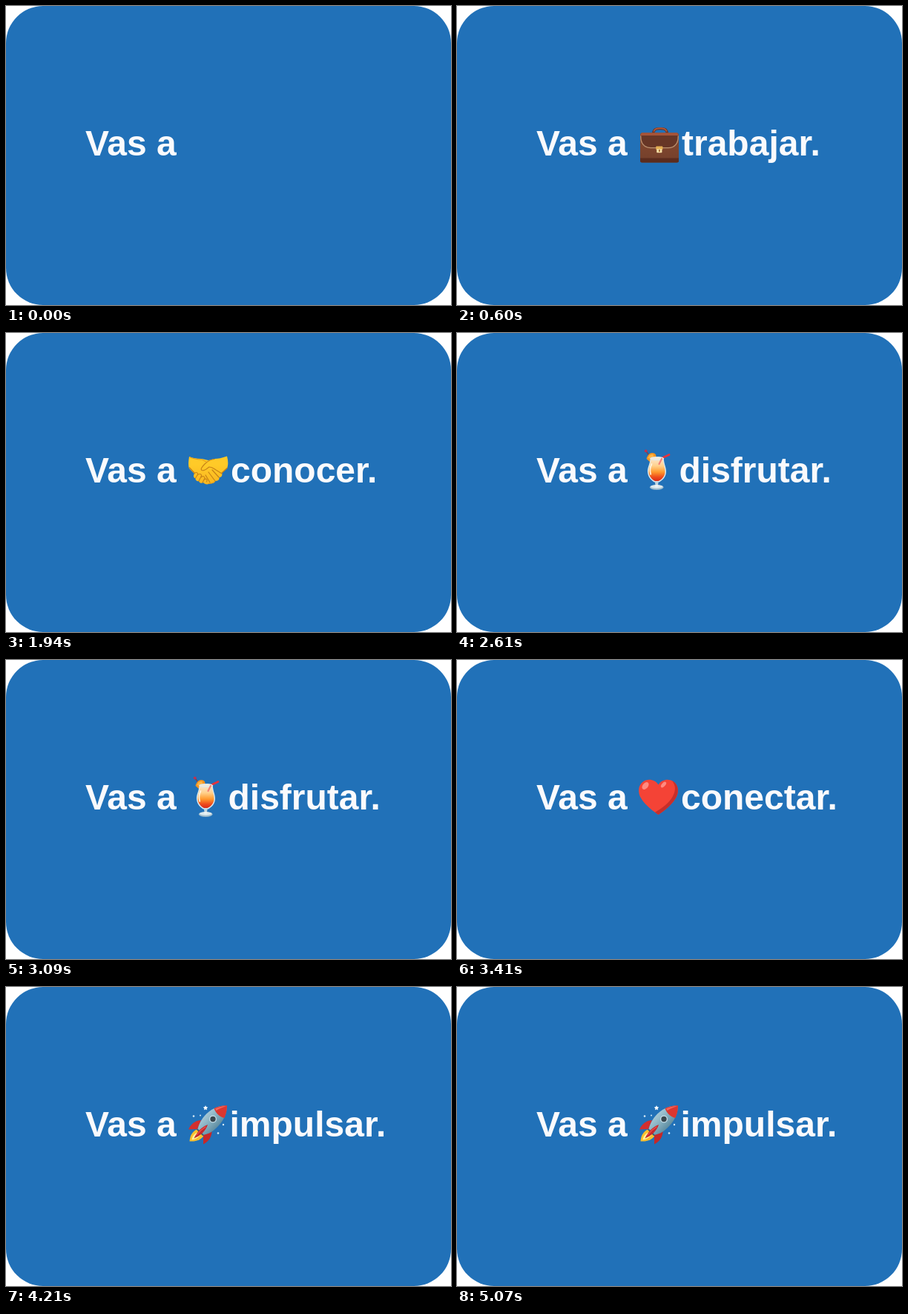
Write an HTML page that moves like this. It is 600 px wide and 404 px high and loops after 5.64 s.

```html
<!DOCTYPE html>
<html lang="es">
<head>
<meta charset="utf-8">
<title>Vas a…</title>
<style>
html, body { margin: 0; width: 100%; height: 100%; overflow: hidden; background: #fff; }
svg { display: block; width: 100%; height: 100%; }
text { font: bold 48px "Liberation Sans", Arial, sans-serif; fill: #fafafc; }
.scene { visibility: hidden; }
.line { fill: none; stroke-linecap: round; stroke-linejoin: round; }
</style>
</head>
<body>
<svg viewBox="0 0 600 404">
  <defs>
    <linearGradient id="leather" x2="0" y2="1">
      <stop offset="0" stop-color="#85492f"/><stop offset="1" stop-color="#74402c"/>
    </linearGradient>
    <linearGradient id="drink" x2="0" y2="1">
      <stop offset="0" stop-color="#fbe3c4"/><stop offset=".3" stop-color="#ffd08a"/>
      <stop offset=".58" stop-color="#ff9a2e"/><stop offset=".82" stop-color="#ee4a1c"/>
      <stop offset="1" stop-color="#d92a1a"/>
    </linearGradient>
    <linearGradient id="hull" x2="1" y2="1">
      <stop offset=".2" stop-color="#b4d3df"/><stop offset=".5" stop-color="#82aebf"/>
      <stop offset=".8" stop-color="#4d7c92"/>
    </linearGradient>
    <linearGradient id="skin" x2="0" y2="1">
      <stop offset=".3" stop-color="#ffca28"/><stop offset="1" stop-color="#f9b61f"/>
    </linearGradient>
  </defs>

  <rect width="600" height="404" rx="50" fill="#2171b8"/>
  <text x="107" y="202">Vas a</text>

  <g class="scene" id="work">
    <path class="line" d="M264.5 172C265.5 166 269 165.6 274 165.6S282.500 166 283.500 172" stroke="#6b3425" stroke-width="3.400"/>
    <path class="line" d="M265.500 169C267 165.500 270 165.200 274 165.200S281 165.500 282.500 169" stroke="#b0593c" stroke-width="1.800"/>
    <path d="M249 171.500H297Q299 171.500 299 174V209Q299 211.500 296.500 211.500H249.500Q247 211.500 247 209V174Q247 171.500 249 171.500Z" fill="url(#leather)"/>
    <path d="M247 205.500H299V209Q299 211.500 296.500 211.500H249.500Q247 211.500 247 209Z" fill="#5b2c1e"/>
    <path d="M248 174H298C299 184 295 191 286 192H260C251 191 247 184 248 174Z" fill="#673626"/>
    <path d="M249 171.300H297L299 175H247Z" fill="#a65438"/>
    <path class="line" d="M247.800 176C247.500 185 252 191.300 261 191.700H285C294 191.300 298.500 185 298.200 176" stroke="#bd9270" stroke-width="1.300"/>
    <rect x="268.300" y="189.500" width="9" height="4.800" rx=".8" fill="#e3ad52"/>
    <rect x="269.200" y="193.300" width="7.200" height="5" rx=".8" fill="#f5dfa6"/>
    <path d="M272 194H273.800V197H272Z" fill="#a86e36"/>
  </g>

  <g class="scene" id="brain">
    <path d="M276 197C279 203 284 207 289 205.500C292 204 295 200 296 196Z" fill="#b94b42"/>
    <path class="line" d="M279 200L291 197M282 203L293 200" stroke="#e08072" stroke-width="1"/>
    <path d="M247 186C246 178 250 172 255 170C260 165 266 164 270 164.500C277 163 285 165 289 168C294 170 298 176 298 181C300 186 300 192 297 196C294 199.500 288 200 284 198C281 201 276 201 272 199C268 203 262 203 258 200C250 199 246 192 247 186Z" fill="#faa3a3"/>
    <path class="line" stroke="#dc6670" stroke-width="1.400" d="M249 181C253 179 254 183 258 181M255 171C255 175 260 174 260 178M262 167C262 171 267 170 267 174C264 174 263 176 264 179M271 165C270 169 275 168 275 172M280 166C278 169 281 171 279 174C276 174 275 177 271 177M288 168C285 171 288 173 287 176C284 176 283 179 279 179M296 176C292 176 293 180 289 181M248 190C252 187 254 191 257 188C260 189 261 185 264 186M254 197C254 193 259 195 261 191C265 193 266 189 269 189M262 202C262 198 267 199 268 195C271 196 274 192 273 189M270 182C272 185 276 183 277 187C281 188 281 184 284 185M277 199C277 195 282 196 282 192M287 198C286 194 290 194 289 190C286 189 287 186 290 185M298 190C295 187 294 190 292 189"/>
    <path class="line" stroke="#ffc6c2" stroke-width="1.100" d="M251 176L253 174M264 168L267 167M274 167L277 167M283 169L285 171M291 173L293 174M256 185L260 184M268 179L272 180M282 182L286 181M276 190L280 190M293 193L295 194"/>
  </g>

  <g class="scene" id="shake">
    <path d="M247 167C246 174 245.500 179 247 183L254 190C252 193 253 196 255.500 196C255 199 258 201 260 200C261 203 264 203.500 266 202C268 205 273 205 275 203C279 204 282 202 282 200C286 200 288 198 287.500 195C291 195 292 192 291 189L298 183C300 178 299.500 172 298 166.500C291 169 286 170 281 170L273 172L264 170C258 170 252 169 247 167Z" fill="url(#skin)"/>
    <path class="line" stroke="#c78217" stroke-width="1.200" d="M247.500 182L254 189M291 189L298 182.500M281 170.500C275 171 272 173 268 177C264 181 262 184 264 185.500C267 187 271 183 274 181C278 181 280 183 283 185L291 190M278 185L287 195M273 188L282 200M269 192L275 202"/>
    <path class="line" stroke="#c78217" stroke-width="1.100" d="M254 190C256 187 260 189 258 192L255.500 196M258 192C261 189 265 191 263 194L260 200M263 195C266 192 269 195 267.500 197L265 202M267.500 198C270 196 272 198 270.500 201"/>
    <path class="line" stroke="#e59b19" stroke-width="1" d="M248 168C253 170 258 171 264 171L270 174M273 203.500C276 204 281 202 281.500 200"/>
  </g>

  <g class="scene" id="cocktail">
    <path class="line" d="M254.500 159L258 164" stroke="#7b4050" stroke-width="1.500"/>
    <circle cx="254.700" cy="159.300" r="1.900" fill="#bf3150"/>
    <path d="M255.500 170C257 164 261 160.500 266 162.500C269 164 269 168 267 171L261 175Z" fill="#f79520"/>
    <path d="M257.500 169C259 165 262 163 265 164.500L264 170Z" fill="#ffb545"/>
    <path class="line" d="M286 164.500L277.500 168.500L271 181" stroke="#e6323c" stroke-width="2.800"/>
    <path d="M260.500 169C260.500 177 256.500 181 257 188C257.500 195 262 199 266 201.500H272.500C277 199 281.500 195 282 188C282.300 181 278.800 177 278.800 169Z" fill="#d9e9ef"/>
    <path d="M261.500 171C261 178 258.300 182 258.500 188C259 194 263 198 267 200H271.500C276 198 280.200 194 280.500 188C280.800 182 278.300 178 277.800 171Z" fill="url(#drink)"/>
    <ellipse cx="269.600" cy="169.500" rx="9" ry="2" fill="#f5ead9" stroke="#dceaf0" stroke-width="1"/>
    <path class="line" d="M276 170L272.500 177" stroke="#f48177" stroke-width="2.200"/>
    <path class="line" d="M262.500 177C260.500 181 259.800 186 261.200 191" stroke="#fff3df" stroke-width="1.700"/>
    <path d="M266.800 200.500H271.700L270.800 207H267.700Z" fill="#c1d6e0"/>
    <ellipse cx="269.200" cy="208.500" rx="9.300" ry="3.400" fill="#9fbccc"/>
    <ellipse cx="269.200" cy="207.600" rx="8.200" ry="2.300" fill="#dce9ee"/>
    <ellipse cx="269.200" cy="206.500" rx="2.500" ry="1.200" fill="#f0f5f7"/>
  </g>

  <g class="scene" id="heart">
    <path id="whole" d="M271.500 168.500C267 161 257.500 160 251.500 164C244 169 243.500 179 248 186.500C253.500 196 264 204 271.500 209C279 204 289.500 196 295 186.500C299.500 179 299 169 291.500 164C285.500 160 276 161 271.500 168.500Z" fill="#f44336"/>
    <path d="M291.500 164C299 169 299.500 179 295 186.500C289.500 196 279 204 271.500 209C270 208 268 206.600 267 205.800C277 200 286 193 290.500 185C295 177 295.500 169 289.500 162.900Z" fill="#c62f2b"/>
    <ellipse cx="254" cy="170" rx="3.600" ry="5.600" transform="rotate(40 254 170)" fill="#ff8a80"/>
    <ellipse cx="278.500" cy="168.500" rx="2.400" ry="4.600" transform="rotate(42 278.500 168.500)" fill="#ff8a80"/>
  </g>

  <g class="scene" id="rocket">
    <path d="M269 160L270 162.100L272.300 162.400L270.600 164L271 166.300L269 165.200L267 166.300L267.400 164L265.700 162.400L268 162.100Z" fill="#fff"/>
    <g fill="#d9ecf8">
      <circle cx="253" cy="174.500" r="1.300"/><circle cx="262" cy="173.500" r="1"/>
      <circle cx="293" cy="186" r="1.200"/><circle cx="286" cy="197.500" r="1.300"/>
    </g>
    <path d="M256 193C250 197 248 202 247.500 208.500C255 209 262 207 266 202L262 193Z" fill="#fbc02d"/>
    <path d="M257 197C252 200 251 203 250.500 206.500C255 206 259 204 262 200Z" fill="#fff59d"/>
    <path d="M263 180C256 180 249 185 246 192.500L258 192Z" fill="#d32f2f"/>
    <path d="M277.500 194C278 202 273 209 266 212.500L266 200Z" fill="#c62828"/>
    <path d="M298 160C287 160 275 165 267 175C262 181 259 188 258.500 193L265.500 200C271 199 277 197 283 191C293 182 298 171 298 160Z" fill="url(#hull)"/>
    <path d="M298 160C292 160 286 161.200 280.500 164C283 171 288 175.500 294.300 177C297 171.500 298 166 298 160Z" fill="#db3630"/>
    <path d="M297 161C291 161.200 286.500 162.200 282 164.300L283.500 167C288 164 292 162.500 297 161Z" fill="#f4665a"/>
    <path class="line" d="M258.500 193L265.500 200" stroke="#405f70" stroke-width="2"/>
    <circle cx="279" cy="178.500" r="5" fill="#c7dee7"/>
    <circle cx="279" cy="178.500" r="3.700" fill="#37474f"/>
    <path d="M272 186C264 189 258 195 253.500 204.500C262 201 269 195 272 186Z" fill="#c5282b"/>
    <path class="line" d="M269 189C264 192 260 196 257 200" stroke="#ef5350" stroke-width="1.200"/>
  </g>

  <text id="word" y="202"></text>
</svg>
<script>
const LOOP = 5640;
// start (ms), icon id, word, word x
const steps = [
  [0, "", "", 303],
  [600, "work", "trabajar.", 303],
  [1270, "brain", "aprender.", 303],
  [1940, "shake", "conocer.", 303],
  [2610, "cocktail", "disfrutar.", 299.5],
  [3410, "heart", "conectar.", 302],
  [4210, "rocket", "impulsar.", 301.5]
];
const word = document.getElementById("word");
const scenes = document.querySelectorAll(".scene");
let current = null;

function show(step) {
  const [, icon, label, x] = step;
  for (const s of scenes) s.style.visibility = s.id === icon ? "visible" : "hidden";
  word.textContent = label;
  word.setAttribute("x", x);
  current = step;
}

const start = performance.now();
function tick() {
  const t = (performance.now() - start) % LOOP;
  const step = steps.findLast(s => s[0] <= t);
  if (step !== current) show(step);
  requestAnimationFrame(tick);
}
tick();
</script>
</body>
</html>
```
